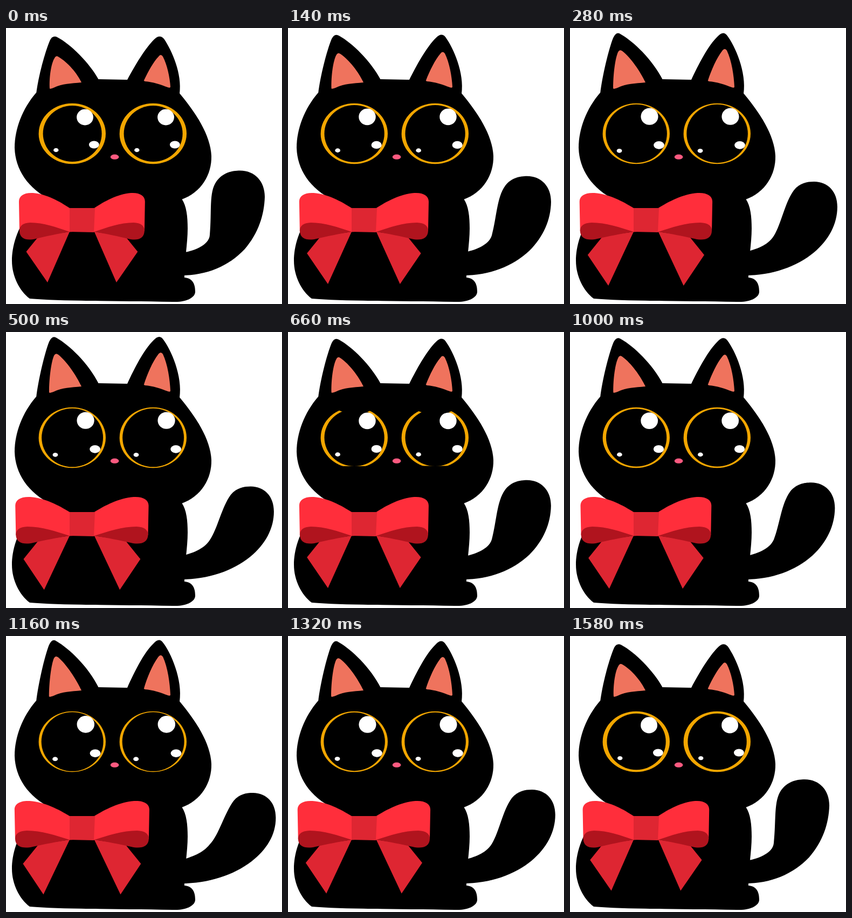
Write an HTML page with a canvas that moves like this. It is 512 px wide and 512 px high and loops after 1600 ms.

```html
<!DOCTYPE html>
<html lang="en">
<head>
<meta charset="utf-8">
<title>Black cat with a bow</title>
<style>
html, body { margin: 0; width: 100%; height: 100%; overflow: hidden; background: #fff; }
canvas { display: block; }
</style>
</head>
<body>
<canvas id="stage" width="512" height="512"></canvas>
<script>
const ctx = document.getElementById('stage').getContext('2d');
const LOOP = 1600, SWAY = 800;
const BLACK = '#000', PINK = '#ef735d', GOLD = '#f2a600';
const RED = '#ff2e3b', CRIMSON = '#de2632', DARK = '#b0141e';

const body = 'M45 340C20 372 11 405 11 432C11 460 25 488 44 502C100 507 200 506 310 508' +
  'C335 509 351 500 351 489C351 472 344 464 331 463C331 430 337 400 337 372C337 350 335 330 326 317L326 300L85 300Z';
const head = 'M56 120C30 150 16 188 16 222C17 262 40 298 85 320L326 318C362 305 382 272 381 237' +
  'C379 198 352 157 321 120L225 96L172 95Z';

// Each pair holds the resting pose and the pose three quarters of the way through a sway.
const POSE = 0.75;
const tail = [
  'M325 417C345 415 377 404 378 384C382 340 376 305 390 285C402 268 420 264.5 434 264.5' +
  'C462 264.5 480 285 480 313C479 347 468 381 443 410C413 442 372 459 325 459Z',
  'M325 416C345 410 366 404 378 386C393 364 400 325 417 302C428 289 441 286.5 454 286.5' +
  'C480 287 497 305 497 333C497 365 481 394 453 417C421 443 375 459 325 459Z'];
const leftEar = [
  'M56 122C60 90 72 45 82 22Q87 13 95 17C120 30 155 65 172 96L172 130L56 130Z',
  'M56 122C60 88 72 38 80 18Q86 5 94 11C117 24 153 58 172 96L172 130L56 130Z'];
const rightEar = [
  'M225 96C240 68 258 38 275 21Q285 11 293 20C308 42 327 85 322 122L310 140L225 130Z',
  'M225 96C238 68 256 32 274 15Q284 4 291 13C306 32 328 82 322 122L310 140L225 130Z'];
const leftInner = [
  'M81 112C80 90 84 65 90 56Q93 50 98 54C115 64 132 84 140 101C120 103 105 103 88 111Q81 114 81 112Z',
  'M80 112C80 85 84 55 89 44Q92 38 97 42C113 55 130 80 140 101C120 103 105 103 88 111Q80 114 80 112Z'];
const rightInner = [
  'M256 97C264 80 274 62 283 53Q287 47 291 53C299 68 304 92 305 109Q305 112 300 110C287 105 272 100 258 99Q255 98 256 97Z',
  'M256 97C262 78 272 55 282 42Q287 35 291 41C300 60 304 88 305 109Q305 112 300 110C287 105 272 100 258 99Q255 98 256 97Z'];

const loopTop = 'M124 334L118 334C100 322 75 308 50 306C34 305 24 311 24 322L25 377L60 382L124 378Z';
const loopFold = 'M120 378L118 378C94 370 70 361 45 361Q25 362 25 376C25 392 40 395 55 391C75 386 95 382 118 378Z';

function fill(path, color) {
  ctx.fillStyle = color;
  ctx.fill(new Path2D(path));
}

function morph([from, to], sway) {
  const ends = to.match(/[\d.]+/g);
  let i = 0;
  return from.replace(/[\d.]+/g, n => (+n + (ends[i++] - n) * sway / POSE).toFixed(2));
}

function oval(x, y, rx, ry, color) {
  ctx.fillStyle = color;
  ctx.beginPath();
  ctx.ellipse(x, y, rx, ry, 0, 0, 2 * Math.PI);
  ctx.fill();
}

function eye(x, sway, blink, lidShift, lidY, lowerY) {
  ctx.save();
  ctx.translate(x, 196);
  oval(0, 0, 62.2, 56.2, GOLD);
  ctx.save();
  const s = 1 + 0.06 * sway;
  ctx.scale(s, s);
  oval(0.3, 0, 54.5, 52, BLACK);
  oval(23.7, -30.5, 15.4, 15, '#fff');
  oval(40.5, 20.5, 9.4, 7, '#fff');
  oval(-30, 30.5, 4.7, 3.7, '#fff');
  ctx.restore();
  if (blink > 0) {
    ctx.beginPath();
    ctx.ellipse(0, 0, 63.5, 57.5, 0, 0, 2 * Math.PI);
    ctx.clip();
    oval(lidShift, lidY - 112 * (1 - blink), 66, 56, BLACK);
    ctx.fillRect(-64, 57 + (lowerY - 57) * blink, 128, 60);
  }
  ctx.restore();
}

function halfBow(sway) {
  const d = 8.4 * sway;
  fill(`M118 378L${77 - d} ${472 + d}L${37.5 - d * 0.8} ${415 + d}L61 386Z`, CRIMSON);
  ctx.save();
  ctx.translate(118, 0);
  ctx.scale(1 + 0.096 * sway, 1);
  ctx.translate(-118, 0);
  fill(loopTop, RED);
  fill(loopFold, DARK);
  ctx.restore();
}

function draw(t) {
  const sway = 1 - Math.abs(t % SWAY / (SWAY / 2) - 1);
  const blink = Math.max(0, Math.min(1, (160 - Math.abs(t - 800)) / 120));

  ctx.fillStyle = '#fff';
  ctx.fillRect(0, 0, 512, 512);
  fill(morph(tail, sway), BLACK);
  fill(body, BLACK);
  fill(head, BLACK);
  for (const ear of [leftEar, rightEar]) fill(morph(ear, sway), BLACK);
  for (const inner of [leftInner, rightInner]) fill(morph(inner, sway), PINK);

  eye(122.8, sway, blink, 1.5, -8, 33.5);
  eye(272.8, sway, blink, 0, -6.5, 31);
  oval(201.6, 239.2, 7.8, 4.6, '#fc5a80');

  halfBow(sway);
  ctx.save();
  ctx.translate(281.8, 0);
  ctx.scale(-1, 1);
  halfBow(sway);
  ctx.restore();
  fill('M118 334L165 334L163 379L118 378Z', CRIMSON);
}

function tick() {
  draw(performance.now() % LOOP);
  requestAnimationFrame(tick);
}
tick();
</script>
</body>
</html>
```
